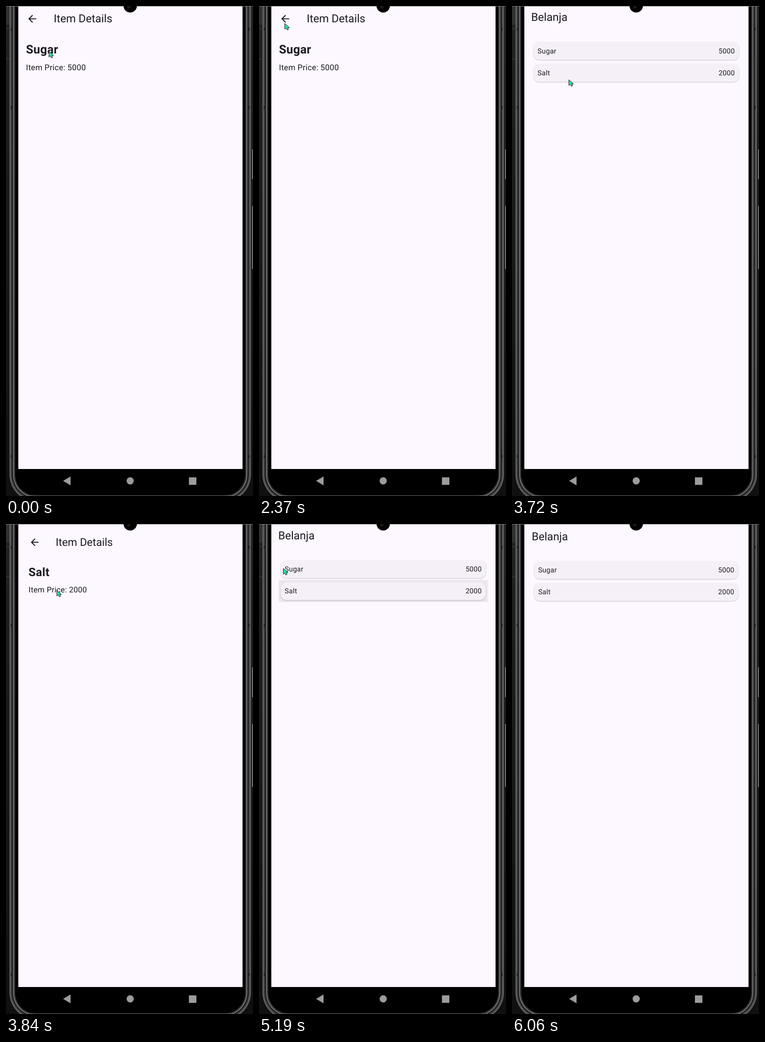
These frames come from a looping animation (532 by 1053 pixels, 6.73 s). An HTML page:

```html
<!DOCTYPE html>
<html lang="en">
<head>
<meta charset="utf-8">
<title>Shopping list demo</title>
<style>
  html, body { margin: 0; height: 100%; overflow: hidden; background: #1b1b1b; }
  svg { display: block; }
  text { font-family: Roboto, sans-serif; fill: #1d1b20; text-rendering: geometricPrecision; }
  .title { font-size: 23.75px; }
  .head { font-size: 25.7px; font-weight: 700; letter-spacing: .27px; }
  .price { font-size: 17.2px; letter-spacing: .27px; }
  .row { font-size: 15px; letter-spacing: .27px; }
  .card { fill: #f5f0f7; filter: drop-shadow(0 1px 1px rgba(0, 0, 0, .22)); }
</style>
</head>
<body>
<svg width="532" height="1053" viewBox="0 0 532 1053">
  <defs>
    <clipPath id="screen"><rect x="26.5" y="1" width="483" height="994"/></clipPath>
    <linearGradient id="side" x2="0" y2="1">
      <stop stop-color="#222"/><stop offset="1" stop-color="#101010"/>
    </linearGradient>
  </defs>

  <rect width="532" height="1053" fill="url(#side)"/>
  <path d="M0 0h8v40h-8z" fill="#303030"/>
  <path d="M0 48.5h8M0 113.5h8" stroke="#484848"/>
  <path d="M531 308v64M531 430v135" stroke="#777" stroke-width="2"/>
  <g id="frame"></g>
  <path d="M50 1052.5H485" stroke="#777"/>

  <g clip-path="url(#screen)">
    <rect x="26" width="484" height="996" fill="#fdf7ff"/>
    <g id="list"></g>
    <g id="detail">
      <path transform="translate(43.7 14.7) scale(1.067)" fill="#1d1b20"
        d="M20 11H7.83l5.59-5.59L12 4l-8 8 8 8 1.41-1.41L7.83 13H20v-2z"/>
      <text class="title" x="102.8" y="35.3">Item Details</text>
      <text class="head" id="name" x="43" y="102"></text>
      <text class="price" id="price" x="43" y="138.4"></text>
    </g>
  </g>

  <path d="M0 .5H532" stroke="#777"/>
  <circle cx="267.5" cy="-.5" r="14.5"/>
  <circle cx="264.5" cy="2" r="3.5" fill="#211815"/>
  <g fill="#9c9c9c">
    <path d="M123 1020.5l16-9.5v19z"/>
    <circle cx="267.5" cy="1020.5" r="7.7"/>
    <rect x="394" y="1013" width="16" height="16"/>
  </g>
  <path id="cursor" d="M.5 .5V12.8L3.4 10.2 5.8 14.5 8.6 13.2 6.8 9.3H10.4z" fill="#1fe9b0" stroke="#000" stroke-width=".9"/>
</svg>
<script>
const LOOP = 6730, TICK = 135, PITCH = 47;
const $ = id => document.getElementById(id);

const items = [
  { name: 'Sugar', price: 5000, open: -TICK * 2, close: 2900 },
  { name: 'Salt', price: 2000, open: 3840, close: 5190 }
];

// Bezel: nested rounded outlines, one per shade, moving inwards
$('frame').innerHTML = ['#626262', '#454545', '#1a1a1a', '#6c6c6c', '#2c2c2c', '#000'].map((shade, i) => {
  const inset = 7.5 + 2.5 * i;
  return `<rect x="${inset}" y="-100" width="${535 - 2 * inset}" height="${1172 - inset}" rx="${65 - inset}" fill="${shade}"/>`;
}).join('') + [50, 218, 968].map(y => `<path d="M10 ${y}h4M521 ${y}h4" stroke="#222" stroke-width="6"/>`).join('');

$('list').innerHTML = '<text class="title" x="42.6" y="35.3">Belanja</text>' + items.map(({ name, price }, i) =>
  `<g transform="translate(0 ${i * PITCH})">
    <rect id="glow${i}" x="43.5" y="75.2" width="448" height="${PITCH}" fill="#ece7ee"/>
    <rect class="card" x="47.8" y="79.8" width="439.6" height="38.4" rx="12.8"/>
    <text class="row" x="56.4" y="104.2">${name}</text>
    <text class="row" x="444" y="104.2">${price}</text>
  </g>`).join('');

// Pointer moves: [first step, last step, x, y], eased out in steps of about one tick
const moves = [
  [120, 540, 58, 40], [1390, 1390, 58, 12], [1980, 2100, 56, 45], [2250, 2370, 55, 37],
  [2900, 3170, 111, 123], [3320, 3320, 122, 158], [3840, 3990, 106, 139], [4140, 4380, 55, 32],
  [5190, 5190, 52, 95], [5310, 5910, 406, 995]
];
const HIDE = 6060;

function pointerAt(t) {
  let x = 92, y = 97;
  for (const [first, last, toX, toY] of moves) {
    if (t < first) break;
    const gaps = Math.round((last - first) / TICK);
    const step = gaps ? Math.floor((t - first) * gaps / (last - first)) : 0;
    const ease = 1 - (1 - Math.min(1, (step + 1) / (gaps + 1))) ** 2.5;
    x += (toX - x) * ease;
    y += (toY - y) * ease;
  }
  return [Math.round(x), Math.round(y)];
}

const show = (id, on) => $(id).setAttribute('visibility', on ? 'inherit' : 'hidden');
const within = (t, start, length) => t >= start && t < start + length;

function listZoom(t) {
  if (items.some(i => within(t, i.open - 120, 120))) return 1.0063;
  return items.some(i => within(t, i.close, 120)) ? 1.005 : 1;
}

function draw(now) {
  const t = now % LOOP;
  const item = items.find(i => t >= i.open && t < i.close);
  const zoom = !item ? listZoom(t) : within(t, item.open, 150) ? .975 : 1;

  show('list', !item);
  show('detail', item);
  $(item ? 'detail' : 'list').setAttribute('transform', `translate(268 498) scale(${zoom}) translate(-268 -498)`);
  items.forEach((it, i) => show('glow' + i, within(t, it.close, 2 * TICK)));
  if (item) {
    $('name').textContent = item.name;
    $('price').textContent = 'Item Price: ' + item.price;
  }

  show('cursor', t < HIDE);
  $('cursor').setAttribute('transform', `translate(${pointerAt(t)})`);
  requestAnimationFrame(draw);
}
draw(performance.now());
</script>
</body>
</html>
```
